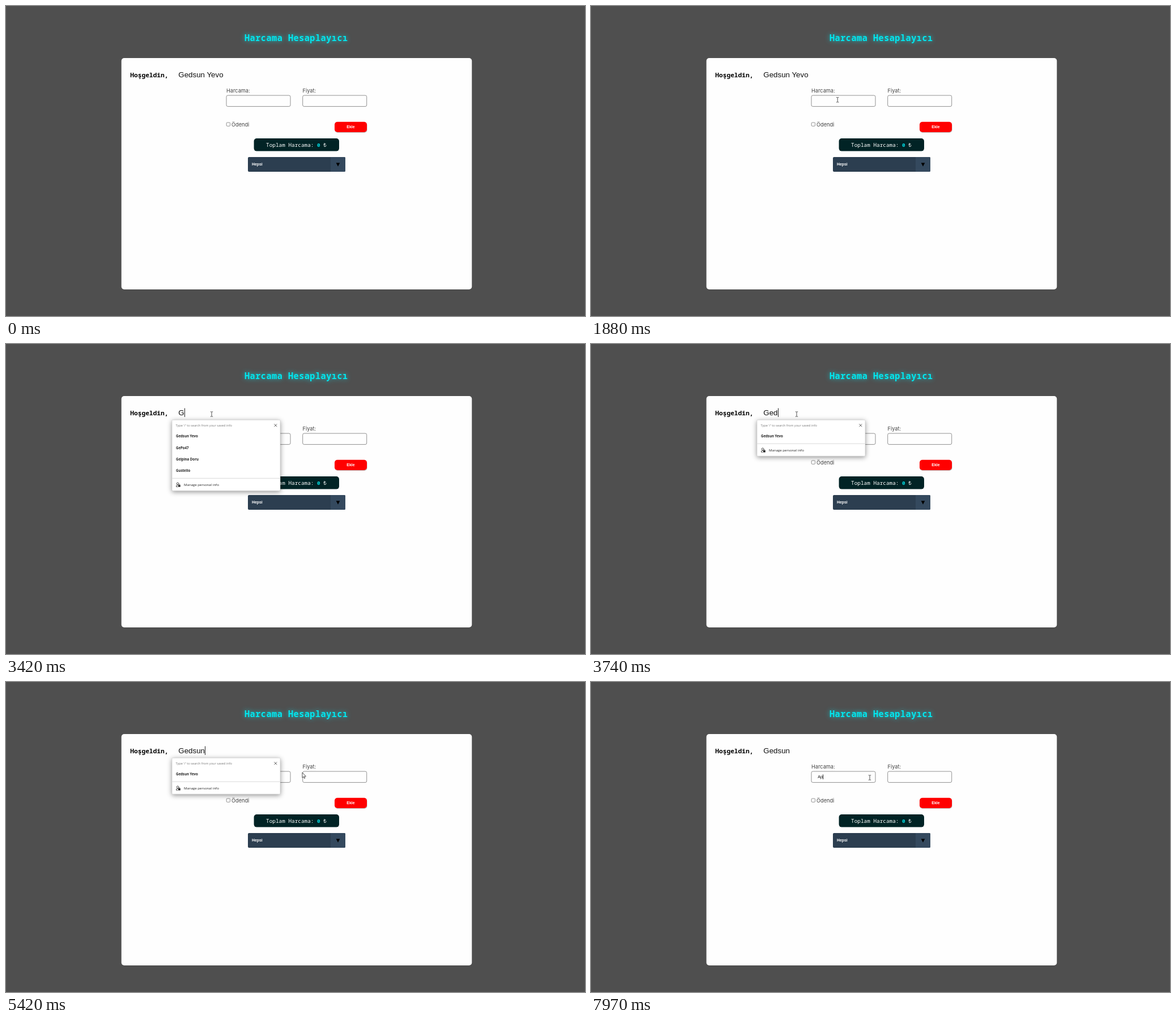
An HTML page that plays this animation: 1022 px wide and 548 px high, repeating every 8 s.

```html
<!DOCTYPE html>
<html lang="tr">
<head>
<meta charset="utf-8">
<title>Harcama Hesaplayıcı</title>
<style>
  html, body { margin: 0; width: 100%; height: 100%; overflow: hidden; background: #4f4f4f; }
  svg { display: block; width: 100%; height: 100%; }
  text { white-space: pre; }
  .mono { font-family: "Noto Sans Mono", "DejaVu Sans Mono", monospace; }
  .title { font-size: 15.2px; font-weight: 700; letter-spacing: .5px; fill: #00e8f0; filter: drop-shadow(0 0 4px rgba(0, 229, 240, .75)); }
  .hello { font-size: 11.2px; font-weight: 700; fill: #000; }
  .total { font-size: 9.4px; fill: #fff; }
  .label { font: 9.2px Inter, sans-serif; fill: #444; }
  .arial { font-family: "Liberation Sans", Arial, sans-serif; }
  .small { font-size: 6.9px; font-weight: 700; fill: #fff; }
  .field { fill: #fefefe; stroke: #858585; stroke-width: .9; }
  .ui { font-family: "Open Sans", "Noto Sans", sans-serif; font-size: 6.1px; fill: #222; }
  #menu { transform-box: fill-box; transform-origin: center; }
  #sheet { fill: #fff; stroke: #c9c9c9; stroke-width: .6; filter: drop-shadow(0 2px 4px rgba(0, 0, 0, .42)); }
</style>
</head>
<body>
<svg viewBox="0 0 1022 548" preserveAspectRatio="none">
  <rect width="1022" height="548" fill="#4f4f4f"/>
  <text class="mono title" x="421" y="62">Harcama Hesaplayıcı</text>
  <rect x="203.7" y="92" width="618.6" height="409" rx="5" fill="#fefefe"/>
  <text class="mono hello" x="219.3" y="126">Hoşgeldin,</text>

  <rect id="selection" y="113" height="17" fill="#0078d7"/>
  <text id="name" class="arial" x="304.3" y="125.8" font-size="13.33" fill="#111"><tspan id="plain"></tspan><tspan id="picked" fill="#fff"></tspan></text>

  <text class="label" x="389" y="153">Harcama:</text>
  <text class="label" x="523.5" y="153">Fiyat:</text>
  <rect class="field" x="389" y="158" width="113" height="19.6" rx="2.6"/>
  <rect class="field" x="523.7" y="158" width="113" height="19.6" rx="2.6"/>
  <text id="item" class="arial" x="400.2" y="170" font-size="7.1" fill="#111"></text>

  <rect x="389.2" y="206" width="6.3" height="6.3" rx="1.2" fill="#fff" stroke="#767676" stroke-width=".8"/>
  <text class="label" x="398" y="213">Ödendi</text>
  <rect x="580.5" y="205.8" width="57" height="18.2" rx="5" fill="#bbb"/>
  <rect x="580" y="204.7" width="57" height="18.3" rx="5" fill="#f00"/>
  <text class="arial small" x="608.4" y="216.3" text-anchor="middle">Ekle</text>

  <rect x="437.6" y="234" width="150.4" height="22.6" rx="5" fill="#012325"/>
  <text class="mono total" x="459" y="249">Toplam Harcama: <tspan fill="#00d5dc" font-weight="600">0</tspan> ₺</text>

  <rect x="427" y="267" width="172" height="26" rx="2" fill="#2c3e50"/>
  <path d="M573 267h24a2 2 0 0 1 2 2v22a2 2 0 0 1-2 2h-24z" fill="#34495e"/>
  <path d="M582.7 277.3h6.6l-3.3 6.4z" fill="#000"/>
  <text class="arial small" x="434" y="282.4">Hepsi</text>

  <g id="menu">
    <rect id="sheet" x="293" y="134.2" width="191" rx="1.5"/>
    <text class="ui" x="299.5" y="146" style="font-size:5.6px;fill:#777">Type '/' to search from your saved info</text>
    <path d="M473.4 141.4l4.8 4.8m0-4.8l-4.8 4.8" stroke="#333" stroke-width=".8"/>
    <g id="rows"></g>
    <g id="foot">
      <path d="M293.4 176.2h190.2" stroke="#d0d0d0" stroke-width=".8"/>
      <circle cx="303" cy="185.7" r="1.8" fill="none" stroke="#222" stroke-width=".8"/>
      <path d="M303.6 191.2h-3v-1.4q0-1.2 1.2-1.2h2" fill="none" stroke="#222" stroke-width=".8"/>
      <rect x="304" y="188" width="3.8" height="3.4" rx=".5" fill="#222"/>
      <path d="M304.9 188v-.6a1 1 0 0 1 2 0v.6" fill="none" stroke="#222" stroke-width=".6"/>
      <text class="ui" x="314" y="190">Manage personal info</text>
    </g>
  </g>

  <rect id="caret" width="1" fill="#222"/>
  <path id="arrow" d="M0 0V9.2L2.1 7.3 3.5 10.4 4.9 9.8 3.6 6.8H6.4Z" fill="#fff" stroke="#222" stroke-width=".8"/>
  <path id="beam" d="M-2.2-4.2h1.7l.5.5.5-.5h1.7M0-3.7v7.4M-2.2 4.2h1.7l.5-.5.5.5h1.7" fill="none" stroke="#333" stroke-width=".85"/>
</svg>
<script>
const LOOP = 8000;
const $ = id => document.getElementById(id);
const show = (el, on) => el.setAttribute('display', on ? 'inline' : 'none');
const place = (el, attrs) => { for (const k in attrs) el.setAttribute(k, attrs[k]); };
const clamp = v => Math.min(1, Math.max(0, v));
const within = (t, spans) => spans.some(([a, b]) => t >= a && t < b);
const latest = (list, t) => list.filter(e => e[0] <= t).pop();

const FIRST = 'Gedsun';
const FULL = FIRST + ' Yevo';
const SAVED = [FULL, 'GePo47', 'Gelpina Doru', 'Gustelio'];
const ROW = 20.4;

// time, length of text, start of the selected part
const NAME = [[0, 11], [2620, 11, 7], [2810, 11, 0], [3420, 1], [3680, 2], [3740, 3],
  [3940, 4], [4040, 5], [4140, 6]];
const ITEM = [[0, ''], [7570, 'A'], [7970, 'Ap']];
const NAME_CARET = [[2450, 2620], [3420, 4670], [5160, 5690]];
const ITEM_CARET = [[5900, 6430], [6980, 7500], [7570, LOOP]];
const OPEN = 2450, SHUT = 5900;

const linear = p => p;
const out = p => 1 - (1 - p) ** 1.7;
const smooth = p => p * p * (3 - 2 * p);
const PATH = [[70, 985, 541], [810, 458, 170, out], [1020, 435.5, 166, out], [1860, 435.5, 166],
  [2430, 363, 124, smooth], [5140, 363, 124], [5290, 440, 113, linear], [5420, 523, 160, linear],
  [5520, 521, 162, linear], [5860, 494, 171, smooth], [6020, 494, 171], [6160, 492, 169, linear]];

const rows = SAVED.map((label, i) => {
  const row = document.createElementNS('http://www.w3.org/2000/svg', 'text');
  place(row, { class: 'ui', x: 300, y: 165.2 + i * ROW, 'font-weight': 700 });
  row.textContent = label;
  $('rows').append(row);
  return row;
});

function pointer(t) {
  const i = PATH.findIndex(k => k[0] > t);
  if (i < 0) return PATH[PATH.length - 1].slice(1, 3);
  const [t0, x0, y0] = PATH[i - 1], [t1, x1, y1, ease = linear] = PATH[i];
  const p = ease((t - t0) / (t1 - t0));
  return [x0 + (x1 - x0) * p, y0 + (y1 - y0) * p];
}

function drawName(t) {
  const [, length, from = length] = latest(NAME, t);
  const text = FULL.slice(0, length);
  $('plain').textContent = text.slice(0, from);
  $('picked').textContent = text.slice(from);
  const x = 304.3 + (from ? $('name').getSubStringLength(0, from) : 0);
  const end = 304.3 + $('name').getComputedTextLength();
  show($('selection'), from < length);
  place($('selection'), { x, width: Math.max(0, end - x) });
  return text;
}

function drawMenu(t, text) {
  const alpha = t < SHUT ? clamp((t - OPEN) / 150) : (1 - clamp((t - SHUT) / 200)) ** 2;
  show($('menu'), alpha > 0);
  $('menu').style.opacity = alpha;
  $('menu').style.transform = `scale(${0.955 + 0.045 * alpha})`;
  const hits = SAVED.filter(s => s.startsWith(text)).length;
  rows.forEach((row, i) => show(row, i < hits));
  const extra = (hits - 1) * ROW;
  place($('sheet'), { height: 64 + extra });
  place($('foot'), { transform: `translate(0 ${extra})` });
}

function drawCaret(t) {
  const inName = within(t, NAME_CARET), inItem = within(t, ITEM_CARET);
  show($('caret'), inName || inItem);
  if (inName) {
    const at = t < 2620 ? 8 : latest(NAME, t)[1];
    place($('caret'), { x: Math.round(304.3 + $('name').getSubStringLength(0, at)), y: 113.5, height: 15.5 });
  } else if (inItem) {
    const width = $('item').textContent ? $('item').getComputedTextLength() : 0;
    place($('caret'), { x: Math.round(400.2 + width), y: 163.5, height: 8.5 });
  }
}

function drawPointer(t) {
  const visible = t >= PATH[0][0];
  const [x, y] = visible ? pointer(t) : [0, 0];
  const overField = x > 389 && x < 502 && y > 158 && y < 178;
  const overName = x > 295 && x < 485 && y < 134;
  const text = overField || overName;
  show($('arrow'), visible && !text);
  show($('beam'), visible && text);
  place($(text ? 'beam' : 'arrow'), { transform: `translate(${x} ${y})` });
}

function draw(t) {
  const text = drawName(t);
  $('item').textContent = latest(ITEM, t)[1];
  drawMenu(t, text);
  drawCaret(t);
  drawPointer(t);
}

const start = performance.now();
function tick() {
  draw((performance.now() - start) % LOOP);
  requestAnimationFrame(tick);
}
tick();
</script>
</body>
</html>
```
